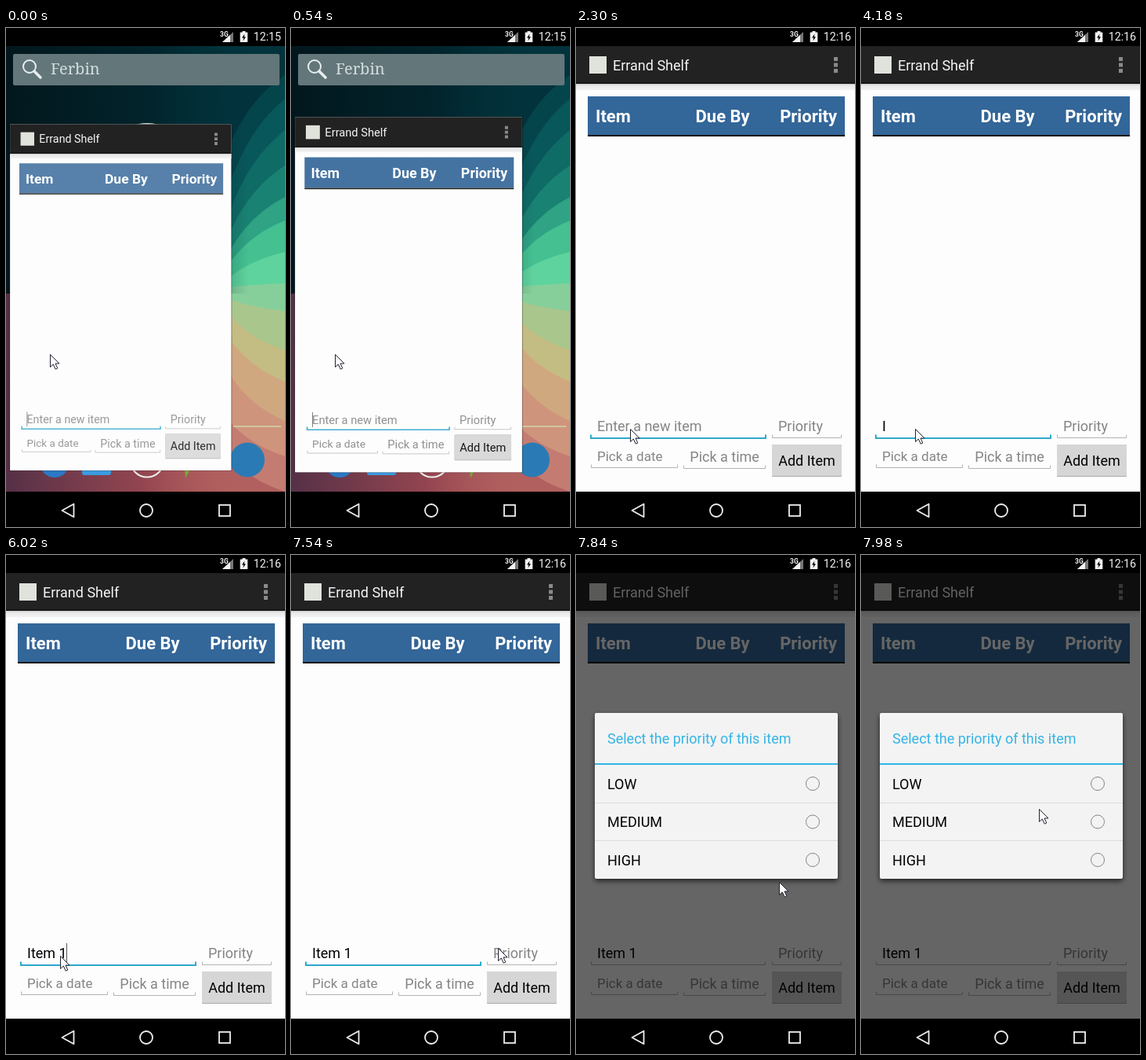
These frames come from a looping animation (356 by 635 pixels, 8000 ms). An HTML page:

```html
<!DOCTYPE html>
<html lang="en">
<head>
<meta charset="utf-8">
<title>Todo list demo</title>
<style>
  html, body { margin: 0; width: 100%; height: 100%; overflow: hidden; background: #000; }
  svg { display: block; width: 100vw; height: 100vh; font: 18px Roboto, sans-serif; }
  text { white-space: pre; }
  .hint { fill: #858585; }
  .head { font-size: 22px; font-weight: 700; fill: #fff; }
  .rule { fill: none; stroke: #b4b4b4; }
</style>
</head>
<body>
<svg viewBox="0 0 356 635" preserveAspectRatio="none">
  <defs>
    <linearGradient id="night">
      <stop offset="0" stop-color="#02171d"/>
      <stop offset=".6" stop-color="#02222a" stop-opacity=".9"/>
      <stop offset="1" stop-color="#02303a" stop-opacity="0"/>
    </linearGradient>
    <linearGradient id="dusk">
      <stop offset="0" stop-color="#553047"/>
      <stop offset=".6" stop-color="#8f424e" stop-opacity=".9"/>
      <stop offset="1" stop-color="#a85558" stop-opacity="0"/>
    </linearGradient>
    <linearGradient id="barShade" x2="0" y2="1">
      <stop offset="0" stop-color="#c8c8c8"/>
      <stop offset=".3" stop-color="#e9e9e9"/>
      <stop offset="1" stop-color="#f3f3f3"/>
    </linearGradient>
    <filter id="soft" x="-10%" y="-10%" width="120%" height="120%"><feGaussianBlur stdDeviation="3"/></filter>
  </defs>

  <g id="home">
    <rect y="23" width="356" height="567" fill="#02333c"/>
    <g id="bands"></g>
    <rect y="23" width="310" height="315" fill="url(#night)"/>
    <rect y="338" width="289" height="252" fill="url(#dusk)"/>
    <rect x="9" y="33" width="340" height="40" rx="2" fill="#63767a"/>
    <g fill="none" stroke="#e8eeee" stroke-linecap="round">
      <circle cx="30" cy="49" r="8" stroke-width="2"/>
      <path d="M36 55L44 63" stroke-width="3.500"/>
    </g>
    <text x="57" y="59" style="font:20px 'Noto Serif',serif" fill="#d3dddd">Ferbin</text>
    <circle cx="180" cy="181" r="60" fill="#e9efef"/>
    <path d="M290 507H351" stroke="#cfc4a0" stroke-width="2"/>
    <ellipse cx="62" cy="555" rx="18" ry="17" fill="#2b78c5"/>
    <rect x="97" y="535" width="37" height="34" rx="3" fill="#3b9be0"/>
    <circle cx="180" cy="550" r="21.500" fill="none" stroke="#eee" stroke-width="2"/>
    <path d="M226 540H246L229 573Z" fill="#7aa83a"/>
    <circle cx="308" cy="549.500" r="22" fill="#2a7bb5"/>
  </g>

  <g id="app">
    <rect x="-1.300" y="22" width="358.600" height="569" opacity=".3"/>
    <rect y="23" width="356" height="567" fill="#fdfdfd"/>
    <rect y="71" width="356" height="8" fill="url(#barShade)"/>
    <rect y="23" width="356" height="48" fill="#222"/>
    <rect y="69.500" width="356" height="1.500" fill="#111"/>
    <rect x="17" y="36" width="22" height="22" fill="#dfe3dc"/>
    <text x="47" y="53.500" fill="#f5f5f5">Errand Shelf</text>
    <path d="M329 37h5v5h-5zM329 44.500h5v5h-5zM329 52h5v5h-5z" fill="#8a8a8a"/>
    <g id="content">
      <rect x="15" y="87" width="328" height="49" fill="#336699"/>
      <rect x="15" y="136" width="328" height="2" fill="#0a0a0a"/>
      <g class="head">
        <text x="25" y="120">Item</text><text x="152.500" y="120">Due By</text>
        <text x="333" y="120" text-anchor="end">Priority</text>
      </g>
      <path id="focus" fill="none"/>
      <path class="rule" d="M250.500 517.500V521.500H338.500V517.500M19.500 555.500V559.500H129.500V555.500M137.500 556.500V560.500H241.500V556.500"/>
      <text id="entry" x="27" y="513"></text>
      <rect id="caret" y="494" width="1" height="24" fill="#555"/>
      <g class="hint">
        <text x="258" y="513">Priority</text>
        <text x="27" y="551" font-size="17">Pick a date</text>
        <text x="145.300" y="552">Pick a time</text>
      </g>
      <rect x="250" y="530" width="89" height="41" rx="1" fill="#aaa"/>
      <rect x="250" y="530" width="89" height="40" rx="1" fill="#d6d6d6"/>
      <text x="294.500" y="557" text-anchor="middle">Add Item</text>
    </g>
  </g>

  <rect id="dim" y="23" width="356" height="567"/>

  <g id="dialog">
    <rect x="24" y="204" width="310" height="211" rx="3" opacity=".65" filter="url(#soft)"/>
    <rect x="24" y="201" width="310" height="211" rx="2" fill="#f3f3f3"/>
    <text x="40" y="240" fill="#33b5e5">Select the priority of this item</text>
    <rect x="24" y="265" width="310" height="2" fill="#33b5e5"/>
    <path d="M24 315.500H334M24 363.500H334" stroke="#dcdcdc"/>
    <g id="options"></g>
  </g>

  <rect width="356" height="23"/>
  <rect y="590" width="356" height="45"/>
  <g fill="#f2f2f2">
    <text x="273" y="11" font-size="8.500" font-weight="700">3G</text>
    <path d="M290 5V18H276Z" fill="#777"/>
    <path d="M286 8.700V18H276Z"/>
    <path d="M301.500 4h4v1.500h2.800V18h-9.600V5.500h2.800z"/>
    <path d="M304.500 7.500L301 12.500H303.200L302.500 16.500L306 11.300H303.900Z" fill="#000"/>
    <text id="clock" x="315.700" y="16" font-size="14.200"></text>
  </g>
  <g fill="none" stroke="#eee" stroke-width="1.800">
    <path d="M86.500 605.800V622.200L71.500 614Z" stroke-linejoin="round"/>
    <circle cx="179" cy="614" r="8"/>
    <rect x="272" y="607" width="14" height="14"/>
  </g>

  <path id="mouse" d="M.5 .5V16.500L4.300 13L7.200 19.200L9.800 18L7 12H12Z" fill="#fff" stroke="#223" stroke-width="1"/>
</svg>
<script>
  const LOOP = 8000;
  const el = id => document.getElementById(id);
  const set = (id, attrs) => {
    for (const name in attrs) el(id).setAttribute(name, attrs[name]);
  };
  const show = (id, on) => set(id, { display: on ? 'inline' : 'none' });

  // Each step holds from its start time until the next one.
  const at = (steps, t) => steps.filter(step => step[0] <= t).pop();

  const zoom = [[0, 5.1, 122.5, .793, .777, .82], [540, 5.1, 113.5, .814, .797, .91], [680, 0, 23, 1, 1, 1]];
  const mouse = [
    [0, 56, 415], [1230, 58, 432], [1350, 65, 478], [1470, 69, 504], [1630, 69, 510],
    [6720, 69, 511], [6870, 104, 513], [7000, 232, 513], [7140, 245, 509],
    [7260, 256, 505], [7380, 263, 501], [7540, 264, 500], [7840, 259, 416], [7980, 227, 323]
  ];
  const typing = [[0, ''], [4180, 'I'], [4720, 'It'], [4860, 'Item'], [5170, 'Item '], [6020, 'Item 1']];
  const carets = [[0, 27], [680, 0], [5170, 67], [5730, 0], [6020, 77], [6600, 0], [7000, 77], [7540, 0]];
  const popup = [[0, 0, 1, 0], [7680, .2, .9935, .95], [7840, .6, 1, 1]];

  // Wallpaper bands: height at the right edge, height beside the window, colour.
  el('bands').innerHTML = [
    [60, 150, '#04454b'], [90, 200, '#08575a'], [130, 235, '#0f6b66'], [175, 262, '#1a8272'],
    [215, 285, '#2fa383'], [245, 300, '#45c191'], [285, 318, '#5fd39d'], [325, 330, '#86cf9b'],
    [360, 345, '#a9c68c'], [410, 365, '#c3bc83'], [450, 395, '#d0a880'], [500, 440, '#cf957c'],
    [545, 500, '#c47c72'], [590, 545, '#b2605f']
  ].map(([right, left, color]) => {
    const bend = (right + left) / 2 + (right - left) / 6;
    return `<path d="M356 ${right}Q310 ${bend} 285 ${left}L0 ${left + 40}V590H356Z" fill="${color}"/>`;
  }).join('');

  el('options').innerHTML = ['LOW', 'MEDIUM', 'HIGH'].map((label, i) => {
    const y = 291 + i * 48.5;
    return `<text x="40" y="${y + 6.5}">${label}</text>
      <circle cx="302" cy="${y}" r="8.5" fill="none" stroke="#858585"/>`;
  }).join('');

  function draw(t) {
    const [, x, y, sx, sy, fade] = at(zoom, t);
    show('home', t < 680);
    set('app', { transform: `translate(${x} ${y}) scale(${sx} ${sy}) translate(0 -23)` });
    set('content', { opacity: fade });

    const text = at(typing, t)[1];
    el('entry').textContent = text || 'Enter a new item';
    set('entry', { fill: text ? '#000' : '#858585' });
    const caretX = at(carets, t)[1];
    show('caret', caretX);
    set('caret', { x: caretX });

    const focused = t < 7680;
    set('focus', focused
      ? { d: 'M19 517.5V522H242V517.5', stroke: '#2fa8cc', 'stroke-width': 2 }
      : { d: 'M19.5 517.5V521.5H241.5V517.5', stroke: '#b4b4b4', 'stroke-width': 1 });

    const [, shade, scale, alpha] = at(popup, t);
    set('dim', { opacity: shade });
    show('dialog', alpha);
    set('dialog', {
      opacity: alpha,
      transform: `translate(179 306.5) scale(${scale}) translate(-179 -306.5)`
    });

    el('clock').textContent = t < 2300 ? '12:15' : '12:16';
    const [, mx, my] = at(mouse, t);
    set('mouse', { transform: `translate(${mx} ${my})` });
  }

  function tick() {
    draw(performance.now() % LOOP);
    requestAnimationFrame(tick);
  }
  tick();
</script>
</body>
</html>
```
